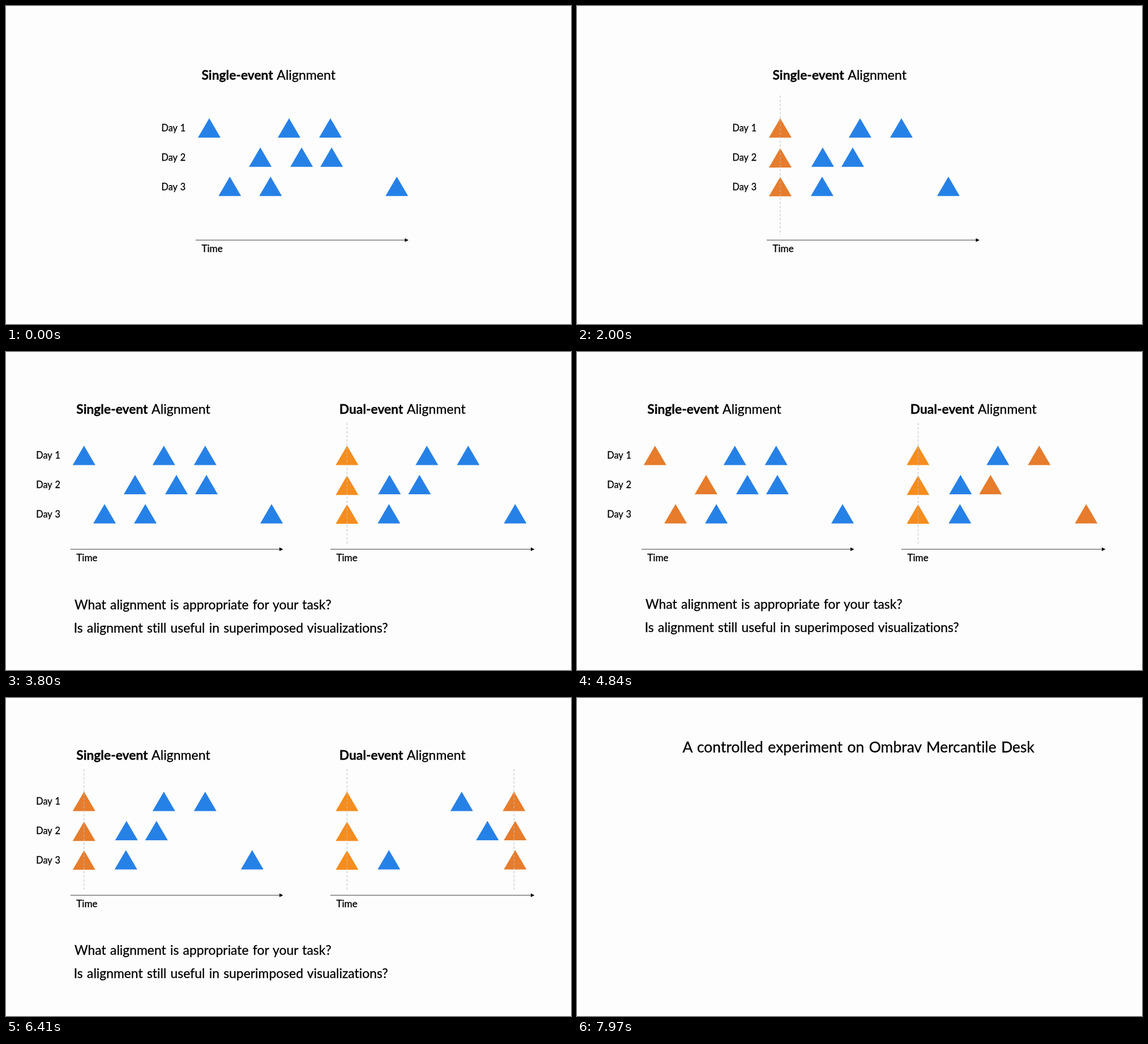
An HTML page for the animation above (8 s loop, 998 by 561 pixels).

```html
<!DOCTYPE html>
<html lang="en">
<head>
<meta charset="utf-8">
<title>Event alignment</title>
<style>
  html, body { margin: 0; width: 100%; height: 100%; overflow: hidden; background: #fdfdfd; }
  svg { display: block; width: 998px; height: 561px; }
  text {
    font-family: Lato, "Open Sans", sans-serif; font-variant-ligatures: none;
    word-spacing: .06em; white-space: pre; fill: #000; stroke: #000; stroke-width: .3;
  }
  .day { font-size: 16.3px; }
  .time { font-size: 17.2px; }
  .title { font-size: 23.1px; }
  .bold { font-size: 22.8px; font-weight: 700; }
  .ask { font-size: 22.9px; }
  .head { font-size: 26.5px; }
  .axis { stroke: #3a3a3a; stroke-width: 1; }
  .dash { stroke: #bdbdbd; stroke-width: 1; stroke-dasharray: 4.2 3; }
</style>
</head>
<body>
<svg id="stage" viewBox="0 0 998 561"></svg>
<script>
const LOOP = 8000, ROW = 51.5;
const BLUE = [38, 129, 231], ORANGE = [230, 124, 44], AMBER = [246, 141, 28];
const stage = document.getElementById("stage");

const ramp = (t, a, b) => Math.min(1, Math.max(0, (t - a) / (b - a)));
const glide = (t, a, b) => (1 - Math.cos(Math.PI * ramp(t, a, b))) / 2;
const lerp = (a, b, p) => a + (b - a) * p;
const mix = (a, b, p) => `rgb(${a.map((v, i) => Math.round(lerp(v, b[i], p)))})`;
const fade = (node, p) => node.setAttribute("opacity", p);
const shift = (node, x, y) => node.setAttribute("transform", `translate(${x} ${y})`);

function add(parent, tag, attrs = {}, content = "") {
  const node = document.createElementNS("http://www.w3.org/2000/svg", tag);
  for (const key in attrs) node.setAttribute(key, attrs[key]);
  node.textContent = content;
  return parent.appendChild(node);
}
const group = parent => add(parent, "g");
const write = (parent, cls, x, y, content) => add(parent, "text", { class: cls, x, y }, content);

// Offsets in pixels: delay of the first event, then the others measured from it;
// "late" is where the middle event ends up once the last ones line up.
const DAYS = [
  { lag: 0, mid: 141, last: 214, late: 202.5 },
  { lag: 90.2, mid: 73, last: 126, late: 246 },
  { lag: 36.3, mid: 72, last: 295, late: 72 }
];
const SPAN = 295;

// x, y: apex of an event on day 1 with no delay
class Panel {
  constructor(parent, { x, y, titleY, axisY, axisFrom = x - 24, axisTo }) {
    Object.assign(this, { x, y, titleY, axisY });
    this.root = group(parent);
    add(this.root, "line", { class: "axis", x1: axisFrom, x2: axisTo - 5, y1: axisY, y2: axisY });
    add(this.root, "path", { d: `M${axisTo} ${axisY}l-6.5 -3.2v6.4z` });
    write(this.root, "time", axisFrom + 10.4, axisY + 21.3, "Time");
    this.events = DAYS.map(() => [0, 1, 2].map(() => add(this.root, "path", { d: "M0 0l20 34.3h-40z" })));
  }
  title(kind) {
    const node = write(this.root, "title", this.x - 13.6, this.titleY, "");
    add(node, "tspan", { class: "bold" }, kind);
    add(node, "tspan", {}, " Alignment");
    return node;
  }
  days() {
    DAYS.forEach((_, r) => write(this.root, "day", this.x - 84.5, this.y + 22.8 + r * 52, `Day ${r + 1}`));
  }
  dash(offset = 0) {
    const x = this.x + offset;
    return add(this.root, "line", { class: "dash", x1: x, x2: x, y1: this.y - 40, y2: this.axisY - 9 });
  }
  // align pulls first events together, stretch does the same for the last ones
  draw(colors, align, stretch) {
    DAYS.forEach(({ lag, mid, last, late }, r) => {
      const base = Math.max(lag * (1 - align), Math.min(lag, 2));
      const xs = [lag * (1 - align), base + lerp(mid, late, stretch), base + lerp(last, SPAN, stretch)];
      this.events[r].forEach((node, n) => {
        const sink = n ? 0 : align * lag / 80;
        shift(node, this.x + xs[n], this.y + r * ROW + sink);
        node.setAttribute("fill", colors[n]);
      });
    });
  }
}

const solo = new Panel(stage, { x: 359, y: 198, titleY: 130, axisY: 413, axisTo: 711 });
const soloSingle = solo.title("Single-event");
const soloDual = solo.title("Dual-event");
const soloDash = solo.dash();
solo.days();

const pair = group(stage);
const board = group(pair);
const row = { y: 165.3, titleY: 109, axisY: 348 };
const left = new Panel(board, { ...row, x: 137.8, axisTo: 489.5 });
const right = new Panel(board, { ...row, x: 602.4, axisFrom: 573, axisTo: 933.5 });
left.title("Single-event");
left.days();
right.title("Dual-event");
right.dash();
const lateDashes = [left.dash(), right.dash(SPAN)];

const asks = group(pair);
write(asks, "ask", 121, 452.6, "What alignment is appropriate for your task?");
write(asks, "ask", 119.8, 494.2, "Is alignment still useful in superimposed visualizations?");

const head = write(stage, "head", 186.5, 96.3, "A controlled experiment on Ombrav Mercantile Desk");

function render(t) {
  const tint = p => mix(BLUE, ORANGE, p);

  const first = ramp(t, 80, 320), dual = ramp(t, 2550, 2790), swap = ramp(t, 3360, 3600);
  fade(solo.root, 1 - swap);
  fade(soloSingle, 1 - dual);
  fade(soloDual, dual);
  fade(soloDash, ramp(t, 1450, 1700));
  solo.draw([tint(first), tint(0), tint(dual)], glide(t, 340, 930), glide(t, 2920, 3350));

  const picked = tint(ramp(t, 4350, 4650)), move = glide(t, 4840, 5440);
  fade(board, swap);
  left.draw([picked, tint(0), tint(0)], move, 0);
  // the right panel starts out aligned on its first events
  right.draw([mix(AMBER, AMBER, 0), tint(0), picked], 1, move);
  lateDashes.forEach(line => fade(line, ramp(t, 5620, 5850)));

  shift(asks, 0, 40 * (1 - ramp(t, 3400, 4170)) ** 5);
  fade(asks, ramp(t, 3400, 3600));

  shift(pair, 0, -561 * glide(t, 6420, 6915));
  fade(head, ramp(t, 7780, 7965));
}

const start = performance.now();
function tick() {
  render((performance.now() - start) % LOOP);
  requestAnimationFrame(tick);
}
tick();
</script>
</body>
</html>
```
